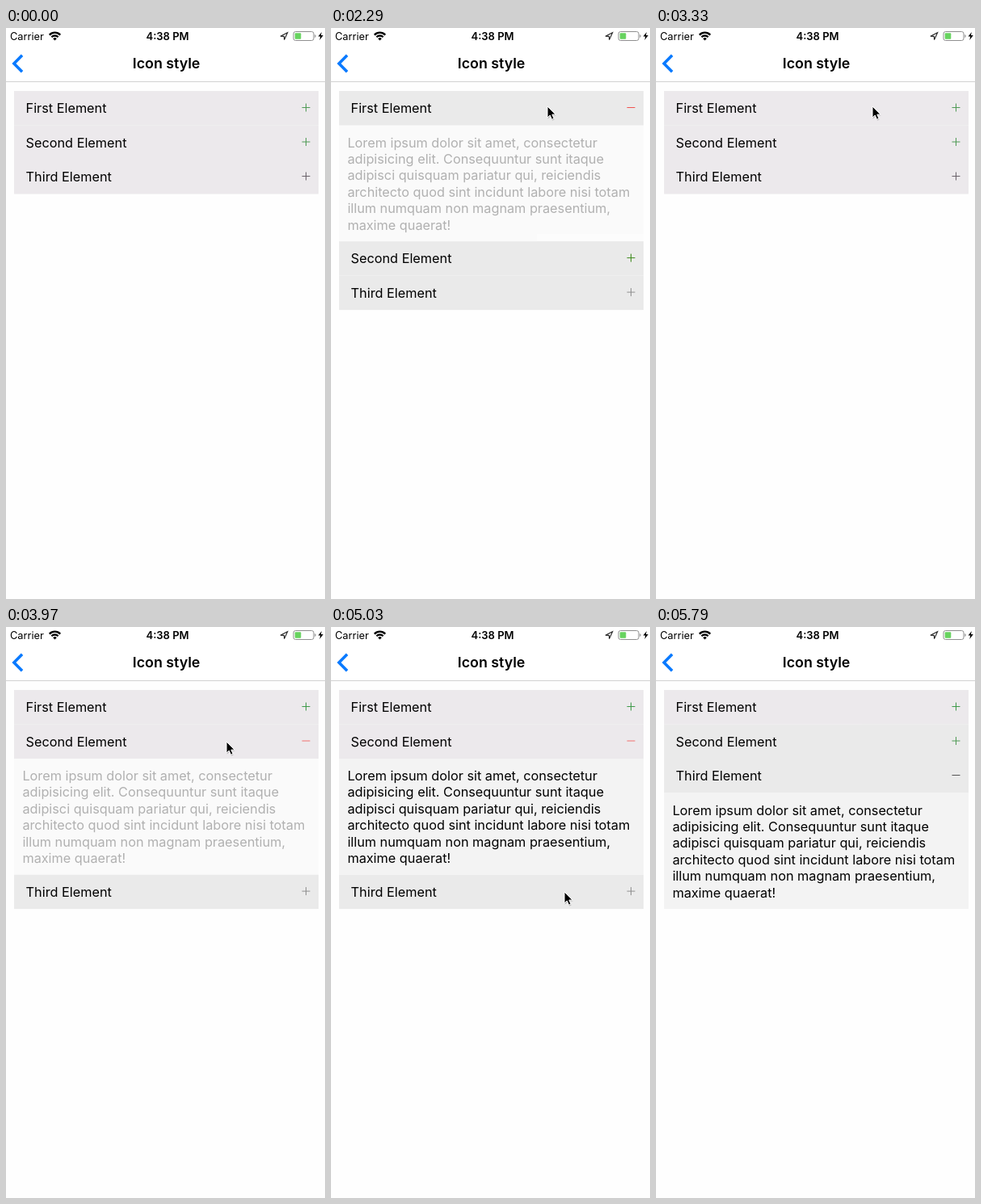
Recreate the animation shown at these times as an HTML page. Size 395 by 707 pixels, loop 6.05 s.

```html
<!DOCTYPE html>
<html lang="en">
<head>
<meta charset="utf-8">
<title>Icon style</title>
<style>
  html, body { margin: 0; width: 100%; height: 100%; overflow: hidden; background: #fefefe; }
  svg { display: block; width: 100%; height: 100%; }
  text { font: 400 16.25px Inter, Roboto, sans-serif; white-space: pre; }
  .small { font-size: 12.8px; }
  .clock { font-size: 13px; font-weight: 600; text-anchor: middle; }
  .title { font-size: 17.8px; font-weight: 600; text-anchor: middle; }
</style>
</head>
<body>
<svg viewBox="0 0 395 707">
  <rect width="395" height="707" fill="#fefefe"/>
  <rect width="395" height="66" fill="#fff"/>
  <rect y="66" width="395" height="1" fill="#d2d2d2"/>

  <text class="small" x="5" y="14.5">Carrier</text>
  <g fill="none" stroke="#000" stroke-width="2.3">
    <path d="M53.8 8.6a9.2 9.2 0 0 1 13.4 0"/>
    <path d="M56.4 11.3a5.6 5.6 0 0 1 8.2 0"/>
  </g>
  <path d="M60.5 15.6l-2.3-2.4a3.2 3.2 0 0 1 4.6 0z"/>
  <text class="clock" x="200" y="14.5">4:38 PM</text>
  <path d="M339.8 10.3L348.6 5.8L344.6 14.6L344.3 10.4Z" fill="none" stroke="#222" stroke-width="1.1"/>
  <rect x="356" y="4.5" width="25" height="11" rx="2.5" fill="#fff" stroke="#8f8f8f"/>
  <rect x="357.7" y="6.2" width="7.6" height="7.6" rx="1" fill="#67d35f"/>
  <path d="M382.3 8v4q1.4-.6 1.4-2t-1.4-2z" fill="#8f8f8f"/>
  <path d="M390.8 5l-4.2 5.6h2.7l-1 4.4l4.5-5.9h-2.8z"/>

  <path d="M20 33.8L9.9 44L20 54.2" fill="none" stroke="#0a7aff" stroke-width="3.6"/>
  <text class="title" x="198.6" y="49.5">Icon style</text>

  <g id="list"></g>
  <g id="cursor">
    <path d="M0 0V14L3.2 11L5.5 16.2L8 15.1L5.8 10.1H10Z" transform="translate(.6 1.4)" opacity=".22"/>
    <path d="M0 0V14L3.2 11L5.5 16.2L8 15.1L5.8 10.1H10Z" stroke="#fff" stroke-width="1"/>
  </g>
</svg>
<script>
const LOOP = 6050, TOP = 78, ROW = 42.5, BODY = 143.6, LINE = 20.4;
const NAMES = ["First Element", "Second Element", "Third Element"];
const LOREM = [
  "Lorem ipsum dolor sit amet, consectetur",
  "adipisicing elit. Consequuntur sunt itaque",
  "adipisci quisquam pariatur qui, reiciendis",
  "architecto quod sint incidunt labore nisi totam",
  "illum numquam non magnam praesentium,",
  "maxime quaerat!"
];

// hold: time the panel rests at its first opacity; greyFrom: first neutral grey row
const STATES = [
  { at: 0, open: -1, greyFrom: 3, icons: ["#4f9a55", "#4f9a55", "#6a626a"] },
  { at: 2230, open: 0, hold: 180, greyFrom: 0, icons: ["#f0524f", "#3d8a1c", "#8f8f8f"] },
  { at: 3330, open: -1, greyFrom: 3, icons: ["#4f9a55", "#4f9a55", "#6a626a"] },
  { at: 3970, open: 1, hold: 90, greyFrom: 2, icons: ["#3f9a4a", "#f0706e", "#8f8f8f"] },
  { at: 5090, open: 2, hold: 30, greyFrom: 1, icons: ["#3f9a4a", "#4f9a55", "#555"] }
];

const smooth = u => u * u * (3 - 2 * u);
const linear = u => u;
const MOVES = [
  { start: 1670, end: 2110, from: [243, 625], via: [194, 350], to: [268, 97], ease: smooth },
  { start: 3530, end: 3730, from: [268, 97], via: [268, 122], to: [273, 142], ease: smooth },
  { start: 4265, end: 4700, from: [273, 142], via: [283, 235], to: [289, 328], ease: smooth },
  { start: 5220, end: 5580, from: [289, 328], via: [320, 480], to: [367, 629], ease: smooth },
  { start: 5610, end: 5790, from: [367, 629], via: [373, 668], to: [377, 708], ease: linear }
];

const list = document.getElementById("list");
const cursor = document.getElementById("cursor");

function add(parent, tag, attrs, content = "") {
  const node = document.createElementNS("http://www.w3.org/2000/svg", tag);
  for (const key in attrs) node.setAttribute(key, attrs[key]);
  node.textContent = content;
  return parent.appendChild(node);
}

const place = (node, x, y) => node.setAttribute("transform", `translate(${x} ${y})`);

const rows = NAMES.map(name => {
  const group = add(list, "g", {});
  const back = add(group, "rect", { width: 377, height: ROW });
  add(group, "text", { x: 14.6, y: 27 }, name);
  const icon = add(group, "path", { fill: "none", "stroke-width": 1 });
  return { group, back, icon };
});

const panel = add(list, "g", {});
add(panel, "rect", { width: 377, height: BODY, fill: "#f3f3f3" });
LOREM.forEach((line, i) => add(panel, "text", { x: 10.4, y: 27 + i * LINE }, line));

function fade(age, hold) {
  if (age < hold) return 0.3;
  const u = Math.min(age / 500, 1);
  const easeIn = v => v ** 1.67;
  return 0.3 + 0.7 * (u < 0.5 ? easeIn(2 * u) / 2 : 1 - easeIn(2 - 2 * u) / 2);
}

function drawList(t) {
  const state = STATES.findLast(s => t >= s.at);
  panel.style.display = state.open < 0 ? "none" : "";
  let y = TOP;
  rows.forEach(({ group, back, icon }, i) => {
    const open = i === state.open;
    place(group, 10, y);
    back.setAttribute("fill", i >= state.greyFrom ? "#eaeaea" : "#ece9ec");
    icon.setAttribute("d", "M356.5 20.5h10" + (open ? "" : "M361.5 15.5v10"));
    icon.setAttribute("stroke", state.icons[i]);
    y += ROW;
    if (open) {
      place(panel, 10, y);
      panel.setAttribute("opacity", fade(t - state.at, state.hold));
      y += BODY;
    }
  });
}

function drawCursor(t) {
  cursor.style.display = t >= 1590 && t < 5790 ? "" : "none";
  const { start, end, from, via, to, ease } = MOVES.findLast(m => t >= m.start) || MOVES[0];
  const u = ease(Math.min(Math.max((t - start) / (end - start), 0), 1)), v = 1 - u;
  const [x, y] = from.map((p, i) => v * v * p + 2 * u * v * via[i] + u * u * to[i]);
  place(cursor, x, y);
}

const begin = performance.now();
function frame() {
  const t = (performance.now() - begin) % LOOP;
  drawList(t);
  drawCursor(t);
  requestAnimationFrame(frame);
}
frame();
</script>
</body>
</html>
```
